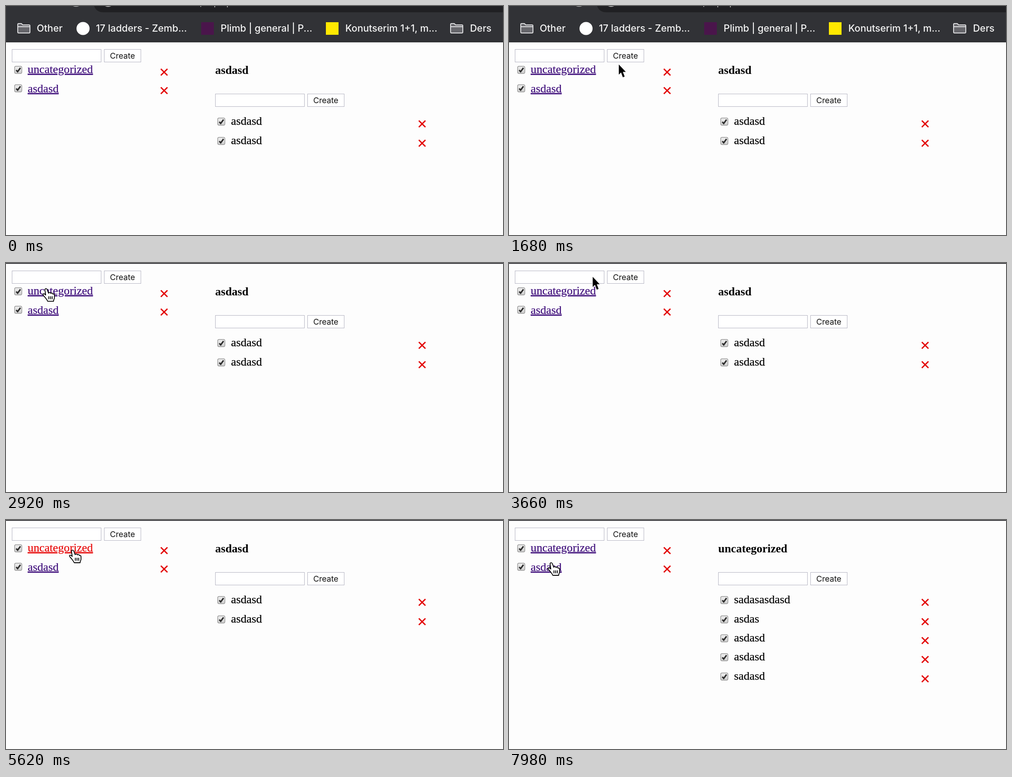
Animation, 1100 px wide and 509 px high, one loop 8000 ms. Source, as an HTML page:

```html
<!DOCTYPE html>
<html lang="en">
<head>
<meta charset="utf-8">
<title>Category list</title>
<style>
  html, body { margin: 0; width: 100%; height: 100%; overflow: hidden; background: #fdfdfd; }
  svg { display: block; width: 1100px; height: 509px; }
  .bar { font: 500 21.3px Inter, sans-serif; fill: #f4f4f4; }
  .page { font: 25.75px "Liberation Serif", serif; }
  .page text { stroke: currentColor; stroke-width: .25; }
  .page .link { fill: #40107c; color: #40107c; text-decoration: underline; text-decoration-thickness: 1.8px; }
  .page .link.active { fill: #e80a0a; color: #e80a0a; }
  .page .title { font-weight: bold; font-size: 25.5px; stroke: none; }
  .page .label { font: 17.7px Inter, sans-serif; fill: #111; stroke: none; }
  .field { fill: #fff; stroke: #b4b4c2; }
  .cross { stroke: #e30505; stroke-width: 2.9; }
</style>
</head>
<body>
<svg viewBox="0 0 1100 509">
  <defs>
    <linearGradient id="grey" x2="0" y2="1">
      <stop stop-color="#f0f0f0"/><stop offset="1" stop-color="#cecece"/>
    </linearGradient>
    <g id="check">
      <rect x="-8" y="-8" width="16" height="16" rx="3" fill="url(#grey)" stroke="#989898" stroke-width="1.4"/>
      <path d="M-4.5 .5L-1.3 4L5-4.5" fill="none" stroke="#2c2c2c" stroke-width="3.1"/>
    </g>
    <path id="cross" class="cross" d="M-7.3-7.3L7.3 7.3M7.3-7.3L-7.3 7.3"/>
    <g id="folder" stroke="#dedee0" stroke-width="2" stroke-linejoin="round">
      <path d="M1 20V3Q1 1 3 1H9L12 4H26Q28 4 28 6V20Q28 22 26 22H3Q1 22 1 20Z" fill="#66666b"/>
      <path d="M1 8H28"/>
    </g>
  </defs>
  <g id="view"></g>
  <g id="cursor">
    <path id="arrow" d="M0 0V22.5L5 17.7L9 28.5L13 26.8L9 16.5H15.5Z" fill="#000"
      stroke="#fff" stroke-width="2.4" paint-order="stroke" stroke-linejoin="round"/>
    <g id="hand" stroke="#000" stroke-width="1.8" stroke-linejoin="round">
      <path d="M-4 3.5C-5-.5 0-1 1 2L4 10C5 8 8.5 8 9 10.5C10.5 9 13 9.5 13.5 12C15 11 17 12 17 14.5V20
        C17 23 15 24 15 28H2C1 25-2 22-4 19C-6 16-9 15-8.5 12.5C-8 10.5-5 11-2.5 14Z" fill="#fff"/>
      <path d="M4.5 17v6.5M8.3 17v6.5M12 17v6.5"/>
    </g>
  </g>
</svg>
<script>
const LOOP = 8000, SCROLL = 79;
const $ = id => document.getElementById(id);
const text = (x, y, s, cls = "", id = "") => `<text x="${x}" y="${y}" class="${cls}" id="${id}">${s}</text>`;
const use = (id, x, y) => `<use href="#${id}" x="${x}" y="${y}"/>`;
const form = (x, y) => `
  <rect class="field" x="${x + .5}" y="${y + .5}" width="197" height="28"/>
  <rect class="field" x="${x + 204.5}" y="${y + .5}" width="81" height="28"/>
  ${text(x + 217, y + 20.5, "Create", "label")}`;

const rowOffsets = [0, 43, 85, 127, 170];
const items = list => list.map((name, i) => {
  const y = rowOffsets[i];
  return use("check", 476.5, 178 + y) + text(498, 184.5 + y, name) + use("cross", 921, 183 + y);
}).join("");

const header = `
  <rect width="1100" height="80.5" fill="#313236"/>
  <path d="M195 0Q200 14 216 14H1100V0Z" fill="#202023"/>
  <path d="M148 0Q155 3 162 0ZM219 0Q226 4 233 0Z" fill="#aaa"/>
  <path d="M431 0V2M462 0V3M490 0V3" stroke="#999" stroke-width="2"/>
  <rect y="79" width="1100" height="1.5" fill="#252528"/>
  ${use("folder", 25, 38)}${use("folder", 983, 38)}
  <circle cx="170.5" cy="50" r="14.5" fill="#fff"/>
  <rect x="432" y="36" width="28" height="28" fill="#4a154b"/>
  <rect x="708" y="36" width="28" height="28" fill="#ffe800"/>
  <g class="bar">${text(68, 57, "Other")}${text(199, 57, "17 ladders - Zemb...")}
  ${text(475, 57, "Plimb | general | P...")}${text(751, 57, "Konutserim 1+1, m...")}${text(1027, 57, "Ders")}</g>`;

$("view").innerHTML = header + `<g class="page" transform="translate(0 ${SCROLL})">
  ${form(13, 17)}${form(463, 116)}
  ${use("check", 27, 63)}${text(48, 69.5, "uncategorized", "link", "first")}${use("cross", 350, 68)}
  ${use("check", 27, 104)}${text(48, 112.5, "asdasd", "link")}${use("cross", 350, 109)}
  ${text(463, 71.5, "", "title", "title")}
  <g id="before">${items(["asdasd", "asdasd"])}</g>
  <g id="after">${items(["sadasasdasd", "asdas", "asdasd", "asdasd", "sadasd"])}</g></g>`;

// Pointer stops: time, x, y
const stops = [
  [0, 300, -40], [1000, 300, -40], [1500, 243, 130], [1800, 243, 130], [2400, 200, 150],
  [2880, 90, 57], [3340, 100, 60], [3900, 240, 12], [4400, 243, 20], [4600, 243, 20],
  [4960, 130, 82], [5450, 149, 67], [5900, 149, 67], [6450, 118, 80], [6700, 118, 80],
  [7300, 90, 98], [7900, 95, 95], [LOOP, 95, 95]
];
const ease = k => (k = Math.min(1, Math.max(0, k)), k * k * (3 - 2 * k));

function pointerAt(t) {
  const i = stops.findIndex(s => s[0] > t);
  const [t0, x0, y0] = stops[i - 1], [t1, x1, y1] = stops[i];
  const k = ease((t - t0) / (t1 - t0));
  return [x0 + (x1 - x0) * k, y0 + (y1 - y0) * k];
}

const overLink = (x, y) => x > 48 && (x < 193 && y > 50 && y < 75 || x < 117 && y > 93 && y < 117);
const show = (id, on) => $(id).setAttribute("display", on ? "inline" : "none");

function draw(now) {
  const t = now % LOOP;
  const scroll = Math.round(SCROLL * ease((t - 2000) / 300));
  const [x, y] = pointerAt(t);
  const hover = overLink(x, y - SCROLL + scroll);
  const opened = t >= 5860;
  $("view").setAttribute("transform", `translate(0 ${-scroll})`);
  $("cursor").setAttribute("transform", `translate(${x} ${y})`);
  show("hand", hover);
  show("arrow", !hover);
  show("before", !opened);
  show("after", opened);
  $("title").textContent = opened ? "uncategorized" : "asdasd";
  $("first").classList.toggle("active", t >= 5580 && t < 5800);
  requestAnimationFrame(draw);
}
requestAnimationFrame(draw);
</script>
</body>
</html>
```
